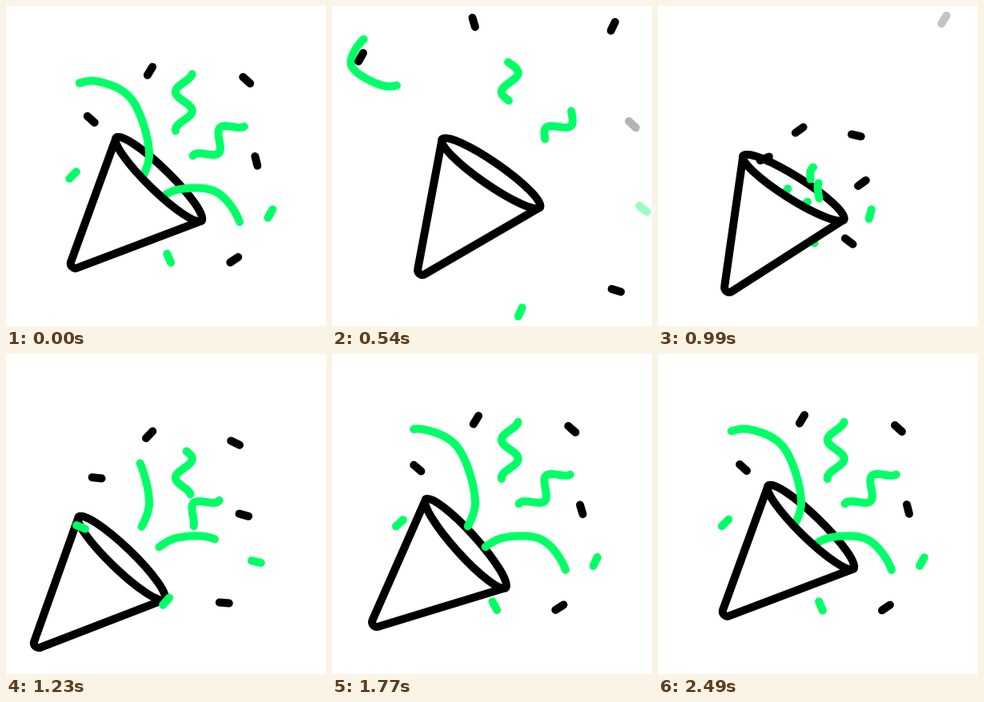
An HTML page with a canvas that plays this animation: 400 by 400 pixels, repeating every 2.52 s.

```html
<!DOCTYPE html>
<html lang="en">
<head>
<meta charset="utf-8">
<title>Party popper</title>
<style>
  html, body { margin: 0; width: 100%; height: 100%; overflow: hidden; background: #fff; }
  canvas { display: block; width: 400px; height: 400px; }
</style>
</head>
<body>
<canvas id="stage" width="400" height="400"></canvas>
<script>
const ctx = document.getElementById('stage').getContext('2d');
const LOOP = 2520, GREEN = '#00ff66', BLACK = '#000';
const BURST = 830, KICK = 860, UNROLL = 960, CLEAR = 1150;
const ORIGIN = { x: 172, y: 261 };

const clamp = x => Math.min(1, Math.max(0, x));
const mix = (a, b, p) => a + (b - a) * p;
const rad = degrees => degrees * Math.PI / 180;
const easeOut = (t, start, span, power) => 1 - (1 - clamp((t - start) / span)) ** power;
const smooth = (t, start, span) => {
  const u = clamp((t - start) / span);
  return u * u * (3 - 2 * u);
};

// The cone tips over its upper rim corner, recoils from the shot and settles back
function conePose(t) {
  const tilt = smooth(t, 0, 900);
  const swing = smooth(t, KICK, 590);
  const settle = smooth(t, 1400, 900);
  const recoil = 1 - smooth(t, 1200, 1050);
  return {
    x: 138 - 47 * recoil * easeOut(t, KICK, 312, 2),
    y: 165 + 3 * (tilt - swing) + 39 * recoil * easeOut(t, KICK, 433, 2),
    angle: rad(44.2 - 14.5 * tilt + 20.5 * swing - 6 * settle)
  };
}

function inCone(pose, draw) {
  ctx.save();
  ctx.translate(pose.x, pose.y);
  ctx.rotate(pose.angle);
  ctx.translate(74, 0);
  ctx.strokeStyle = BLACK;
  ctx.fillStyle = '#fff';
  ctx.beginPath();
  draw();
  ctx.stroke();
  ctx.restore();
}

function coneBack() {
  ctx.ellipse(0, 0, 74.5, 14, 0, Math.PI, 2 * Math.PI);
}

function coneFront() {
  ctx.ellipse(0, 0, 74.5, 14, 0, 0, Math.PI);
  ctx.arcTo(-1.5, 162.5, 74, 1, 6);
  ctx.closePath();
  ctx.fill();
}

// Resting place and angle, then drift and turn while flying off for `life` ms;
// `spin` is the turn still left late in the burst
const bit = (color, x, y, angle, dx, dy, life, turn, spin) =>
  ({ color, x, y, angle, dx, dy, life, turn, spin });
const CONFETTI = [
  bit(BLACK, 180, 81.5, 121, -3, -65, 890, 294, 4),
  bit(BLACK, 300.5, 93, 42, 57, -76, 1038, -302, -5),
  bit(BLACK, 106.5, 142, 42, -74, -82, 850, 160, -11),
  bit(BLACK, 312.5, 194, 76, 63, -46, 600, 174, -19),
  bit(BLACK, 285, 317, -34, 73, 40, 810, -245, 12),
  bit(GREEN, 84, 211, -45, -72, 72, 510, -87, 21),
  bit(GREEN, 330, 259.5, 119, 59, -6, 620, 124, -33),
  bit(GREEN, 203.5, 315, 67, 33, 70, 810, 90, -36)
];

function dash(color, x, y, angle, alpha = 1) {
  const dx = 6 * Math.cos(rad(angle)), dy = 6 * Math.sin(rad(angle));
  ctx.globalAlpha = alpha;
  ctx.strokeStyle = color;
  ctx.beginPath();
  ctx.moveTo(x - dx, y - dy);
  ctx.lineTo(x + dx, y + dy);
  ctx.stroke();
  ctx.globalAlpha = 1;
}

function flyAway(t) {
  for (const b of CONFETTI.filter(b => t < b.life)) {
    const p = easeOut(t, 0, b.life, 3);
    const angle = b.angle + b.turn * (t / b.life) ** 1.6;
    dash(b.color, b.x + b.dx * p, b.y + b.dy * p, angle, clamp((b.life - t) / 200));
  }
}

function burst(t) {
  if (t < BURST) return;
  const left = 2 ** ((BURST - t) / 125);
  const turn = Math.max(0, (1908 - t) / 378) ** 2;
  for (const b of CONFETTI) {
    dash(b.color, mix(b.x, ORIGIN.x, left), mix(b.y, ORIGIN.y, left), b.angle + b.spin * turn);
  }
}

// Catmull-Rom curve; u counts the points
const spline = points => u => {
  const last = points.length - 1;
  const i = Math.min(last - 1, Math.floor(u)), f = u - i;
  const at = k => points[Math.min(last, Math.max(0, k))];
  return [0, 1].map(n => {
    const [a, b, c, d] = [at(i - 1)[n], at(i)[n], at(i + 1)[n], at(i + 2)[n]];
    return b + f / 2 * (c - a + f * (2 * a - 5 * b + 4 * c - d + f * (3 * (b - c) + d - a)));
  });
};

// Sine ribbon rising through (cx, cy); `bend` pulls its lower end to the left
const wave = (cx, cy, turn, bend) => u => {
  const y = 96 - u;
  const x = 10.5 * Math.cos(Math.PI * (y - 10.5) / 23.7) - bend * Math.max(0, y - 44) ** 2;
  const c = Math.cos(rad(turn)), s = Math.sin(rad(turn));
  return [cx + c * x - s * y, cy + s * x + c * y];
};

// [tail, head] pairs: resting place on the path, distance rushed while leaving,
// and time taken to unroll
const SPLINE_RIBBON = { power: 2 };
const WAVE_RIBBON = { rest: [60.5, 131.5], rush: [117, 46], end: 177.5, power: 2.5 };
const STREAMERS = [
  {
    ...SPLINE_RIBBON, rest: [0.5, 3.45], rush: [7.84, 5.85], end: 8, spans: [300, 1350],
    path: spline([[158, 236], [179, 186], [158, 118], [113, 94], [66, 100],
      [24, 74], [45, 38], [78, 54], [72, 75]])
  },
  {
    ...SPLINE_RIBBON, rest: [0.45, 3], rush: [12.3, 8.1], end: 5, spans: [300, 900],
    path: spline([[180, 250], [213, 230], [262, 232], [292, 270], [290, 312], [262, 350]])
  },
  { ...WAVE_RIBBON, spans: [700, 780], path: wave(222.3, 120.5, 0, 0.013) },
  { ...WAVE_RIBBON, spans: [700, 900], path: wave(265.7, 169, 44, 0) }
];

function streamer(s, t) {
  const leaving = s.rest.map((r, i) => Math.min(s.end, r + s.rush[i] * (t / 850) ** s.power));
  const growing = s.rest.map((r, i) => r * easeOut(t, UNROLL + 50 * (1 - i), s.spans[i], 3));
  const [tail, head] = t < UNROLL ? leaving : growing;
  if (tail >= head) return;
  ctx.strokeStyle = GREEN;
  ctx.beginPath();
  for (let k = 0; k <= 60; k++) ctx.lineTo(...s.path(mix(tail, head, k / 60)));
  ctx.stroke();
}

function render(t) {
  const pose = conePose(t);
  ctx.fillStyle = '#fff';
  ctx.fillRect(0, 0, 400, 400);
  ctx.lineWidth = 10;
  ctx.lineCap = ctx.lineJoin = 'round';
  inCone(pose, coneBack);
  if (t < CLEAR) burst(t);
  STREAMERS.forEach(s => streamer(s, t));
  inCone(pose, coneFront);
  if (t >= CLEAR) burst(t);
  flyAway(t);
}

const start = performance.now();
function tick() {
  render((performance.now() - start) % LOOP);
  requestAnimationFrame(tick);
}
tick();
</script>
</body>
</html>
```
